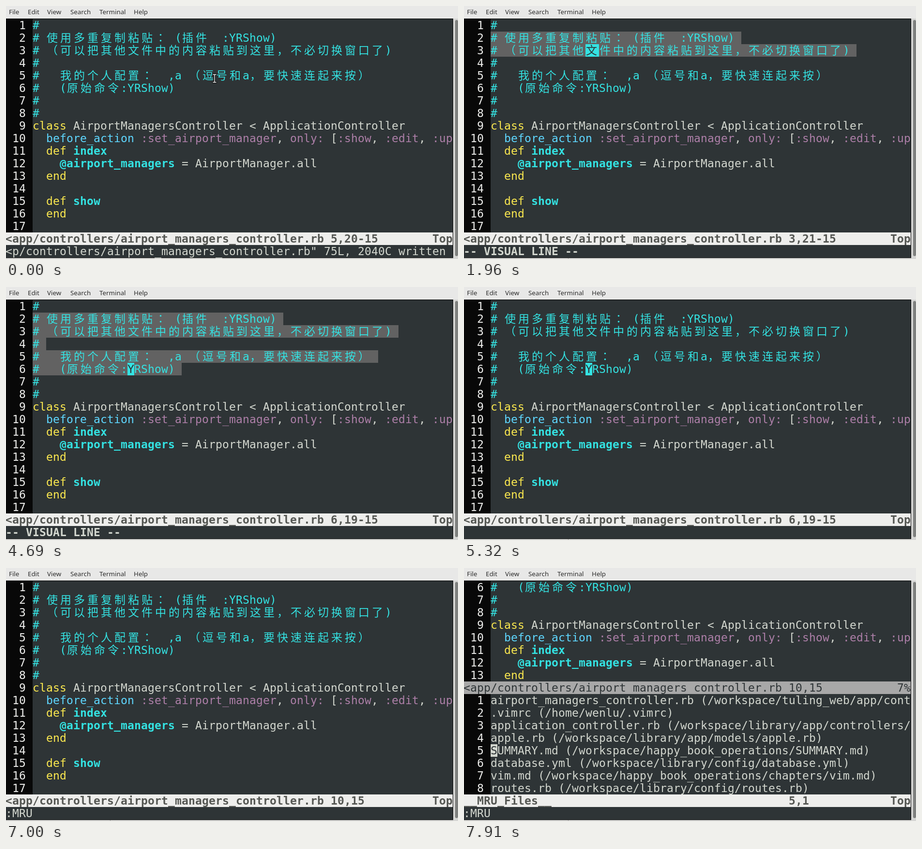
Write an HTML page with a canvas that moves like this. It is 934 px wide and 524 px high and loops after 8 s.

```html
<!DOCTYPE html>
<html lang="zh-CN">
<head>
<meta charset="utf-8">
<title>Terminal</title>
<style>
html, body { margin: 0; width: 100%; height: 100%; overflow: hidden; background: #2e3436; }
canvas { display: block; width: 934px; height: 524px; }
</style>
</head>
<body>
<canvas id="stage" width="934" height="524"></canvas>
<script>
const ctx = document.getElementById('stage').getContext('2d');
const LOOP = 8000, CW = 14, RH = 26, X0 = -1, Y0 = 27, COLS = 66, GUTTER = 4;
const BG = '#2e3436', FG = '#d3d7cf', WHITE = '#eeeeec', CYAN = '#34e2e2',
      YELLOW = '#fce94f', BLUE = '#5fd7ff', PURPLE = '#ad7fa8',
      SELECT = '#626262', NUMBERS = '#080808';
const MONO = '23px "DejaVu Sans Mono", monospace';

const CODE = [
  '#',
  '# 使用多重复制粘贴： (插件  :YRShow)',
  '# （可以把其他文件中的内容粘贴到这里，不必切换窗口了)',
  '#',
  '#   我的个人配置：  ,a （逗号和a，要快速连起来按）',
  '#   (原始命令:YRShow)',
  '#',
  '#',
  'class AirportManagersController < ApplicationController',
  '  before_action :set_airport_manager, only: [:show, :edit, :up',
  '  def index',
  '    @airport_managers = AirportManager.all',
  '  end',
  '',
  '  def show',
  '  end',
  ''
];
const RECENT = [
  'airport_managers_controller.rb (/workspace/tuling_web/app/cont',
  '.vimrc (/home/wenlu/.vimrc)',
  'application_controller.rb (/workspace/library/app/controllers/',
  'apple.rb (/workspace/library/app/models/apple.rb)',
  'SUMMARY.md (/workspace/happy_book_operations/SUMMARY.md)',
  'database.yml (/workspace/library/config/database.yml)',
  'vim.md (/workspace/happy_book_operations/chapters/vim.md)',
  'routes.rb (/workspace/library/config/routes.rb)'
];
const PATH = '<app/controllers/airport_managers_controller.rb';
const WRITTEN = '<p/controllers/airport_managers_controller.rb" 75L, 2040C written';
const VISUAL = '-- VISUAL LINE --';

// Each step changes only the listed fields; cur is [row, column].
const STEPS = [
  [0, { ruler: '5,20-15', cur: [4, 18], off: true, sel: 0, cmd: WRITTEN, pointer: true, split: false }],
  [420, { ruler: '4,1', cur: [3, 4], off: false, pointer: false }],
  [630, { ruler: '3,21-15', cur: [2, 18] }],
  [840, { ruler: '2,21-15', cur: [1, 18] }],
  [1260, { sel: 2, cmd: VISUAL }],
  [1960, { ruler: '3,21-15', cur: [2, 18], sel: 3 }],
  [2730, { off: true }],
  [2870, { cur: [3, 4], off: false, sel: 4 }],
  [2940, { ruler: '4,1' }],
  [3780, { ruler: '5,20-15', cur: [4, 18], sel: 5 }],
  [4480, { off: true }],
  [4690, { ruler: '6,19-15', cur: [5, 18], off: false, sel: 6 }],
  [5320, { sel: 0, cmd: '' }],
  [5460, { ruler: '7,1', cur: [6, 4] }],
  [5600, { ruler: '8,1', cur: [7, 4] }],
  [5810, { ruler: '9,15', cur: [8, 18] }],
  [5950, { ruler: '10,15', cur: [9, 18] }],
  [6230, { cmd: ':', cur: [18, 1] }],
  [6440, { cmd: ':w', cur: [18, 2] }],
  [6510, { off: true }],
  [6580, { cmd: WRITTEN, cur: [9, 18], off: false }],
  [7000, { cmd: ':MRU', off: true }],
  [7140, { split: true, ruler: '1,1', cur: [9, 4], off: false }],
  [7420, { ruler: '2,1', cur: [10, 4] }],
  [7560, { ruler: '3,1', cur: [11, 4] }],
  [7770, { ruler: '4,1', cur: [12, 4] }],
  [7910, { ruler: '5,1', cur: [13, 4] }]
];

const isWide = ch => ch.charCodeAt(0) > 0x2e80;
const cells = text => [...text].reduce((n, ch) => n + (isWide(ch) ? 2 : 1), 0);
const xAt = col => X0 + col * CW;
const yAt = row => Y0 + row * RH;
let grid = {};

function box(x, y, w, h, color) {
  ctx.fillStyle = color;
  ctx.fillRect(x, y, w, h);
}

function fillCells(row, col, count, color) {
  box(xAt(col), yAt(row), count * CW, RH, color);
}

function glyph(row, col, ch, color, bold) {
  const wide = isWide(ch);
  const cjk = ch === '：' ? '"Noto Sans CJK JP"' : '"Noto Sans CJK SC", "Noto Sans CJK"';
  ctx.font = wide ? `23px ${cjk}, sans-serif` : (bold ? 'bold ' : '') + MONO;
  ctx.fillStyle = color;
  ctx.fillText(ch, xAt(col) + (wide ? 1 : 0), yAt(row) + 21);
}

function put(row, col, text, color, bold) {
  for (const ch of text) {
    grid[row + ',' + col] = { ch, color, bold };
    if (ch !== ' ') glyph(row, col, ch, color, bold);
    col += isWide(ch) ? 2 : 1;
  }
  return col;
}

function tokens(line) {
  if (line[0] === '#') return [[line, CYAN]];
  const parts = line.split(/(\b(?:class|def|end)\b|before_action|only:|:\w+|@\w+)/);
  let afterDef = false;
  return parts.map(p => {
    if (afterDef) { afterDef = false; return [p, CYAN, true]; }
    if (p === 'def') afterDef = true;
    if (/^(class|def|end)$/.test(p)) return [p, YELLOW];
    if (p === 'before_action') return [p, BLUE];
    if (p === 'only:' || /^:\w/.test(p)) return [p, PURPLE];
    if (p[0] === '@') return [p, CYAN, true];
    return [p, FG];
  });
}

function numberedLine(row, n, parts) {
  put(row, 0, String(n).padStart(3), WHITE);
  let col = GUTTER;
  for (const [text, color, bold] of parts) col = put(row, col, text, color, bold);
}

function codeLines(first, count) {
  for (let i = 0; i < count; i++) numberedLine(i, first + i, tokens(CODE[first + i - 1]));
}

function status(row, name, ruler, place, color, bold) {
  put(row, 0, name, color, bold);
  put(row, 48, ruler, color, bold);
  put(row, COLS - place.length, place, color, bold);
}

function menu() {
  box(0, 0, 934, 26, '#e8e8e7');
  ctx.font = '13.33px "Noto Sans", sans-serif';
  ctx.fillStyle = '#2b2b2b';
  [['File', 6], ['Edit', 45], ['View', 85], ['Search', 133], ['Terminal', 193], ['Help', 264]]
    .forEach(([label, x]) => ctx.fillText(label, x, 17));
}

function frameEdges() {
  box(0, 26, 924, 1, '#000');
  box(923, 26, 1, 496, '#000');
  box(0, 521, 924, 1, '#111');
  box(0, 522, 934, 2, '#d6d6d4');
  box(924, 26, 10, 498, '#d6d6d4');
  box(215, 522, 1, 2, '#a8a8a6');
  ctx.fillStyle = '#7e807e';
  ctx.beginPath();
  ctx.roundRect(928, 29, 6, 489, 3);
  ctx.fill();
}

function ibeam(x, y) {
  ctx.lineCap = 'square';
  for (const [color, width] of [['#000', 3.4], ['#fff', 1.4]]) {
    ctx.strokeStyle = color;
    ctx.lineWidth = width;
    ctx.beginPath();
    ctx.moveTo(x - 3, y - 8); ctx.lineTo(x + 3, y - 8);
    ctx.moveTo(x, y - 8); ctx.lineTo(x, y + 8);
    ctx.moveTo(x - 3, y + 8); ctx.lineTo(x + 3, y + 8);
    ctx.stroke();
  }
}

function cursor([row, col]) {
  const cell = grid[row + ',' + col] || { ch: ' ', color: FG };
  fillCells(row, col, isWide(cell.ch) ? 2 : 1, cell.color);
  glyph(row, col, cell.ch, BG, cell.bold);
}

function draw(s) {
  grid = {};
  box(0, 0, 934, 524, BG);
  box(0, Y0, 55, 17 * RH, NUMBERS);
  if (s.split) fillCells(8, 0, COLS, '#a8a8a8');
  fillCells(17, 0, COLS, WHITE);
  for (let n = 2; n <= s.sel; n++) fillCells(n - 1, GUTTER, cells(CODE[n - 1]) + 1, SELECT);
  if (s.sel && s.off) fillCells(s.cur[0], s.cur[1], 2, BG);
  frameEdges();
  menu();

  if (s.split) {
    codeLines(6, 8);
    status(8, PATH, '10,15', '7%', BG, false);
    RECENT.forEach((text, i) => numberedLine(9 + i, i + 1, [[text, FG]]));
    status(17, '__MRU_Files__', s.ruler, 'Top', '#555753', true);
  } else {
    codeLines(1, 17);
    status(17, PATH, s.ruler, 'Top', '#555753', true);
  }
  put(18, 0, s.cmd, FG, s.cmd === VISUAL);
  if (!s.off) cursor(s.cur);
  if (s.pointer) ibeam(431, 150);
}

let shown = -1;
function tick(now) {
  const t = now % LOOP;
  const count = STEPS.filter(step => step[0] <= t).length;
  if (count !== shown) {
    shown = count;
    draw(Object.assign({}, ...STEPS.slice(0, count).map(step => step[1])));
  }
  requestAnimationFrame(tick);
}

const start = performance.now();
const run = () => tick(Math.max(0, performance.now() - start));
tick = (base => function () {
  base(Math.max(0, performance.now() - start));
})(function (now) {
  const t = now % LOOP;
  const count = STEPS.filter(step => step[0] <= t).length;
  if (count !== shown) {
    shown = count;
    draw(Object.assign({}, ...STEPS.slice(0, count).map(step => step[1])));
  }
  requestAnimationFrame(tick);
});
run();
</script>
</body>
</html>
```
